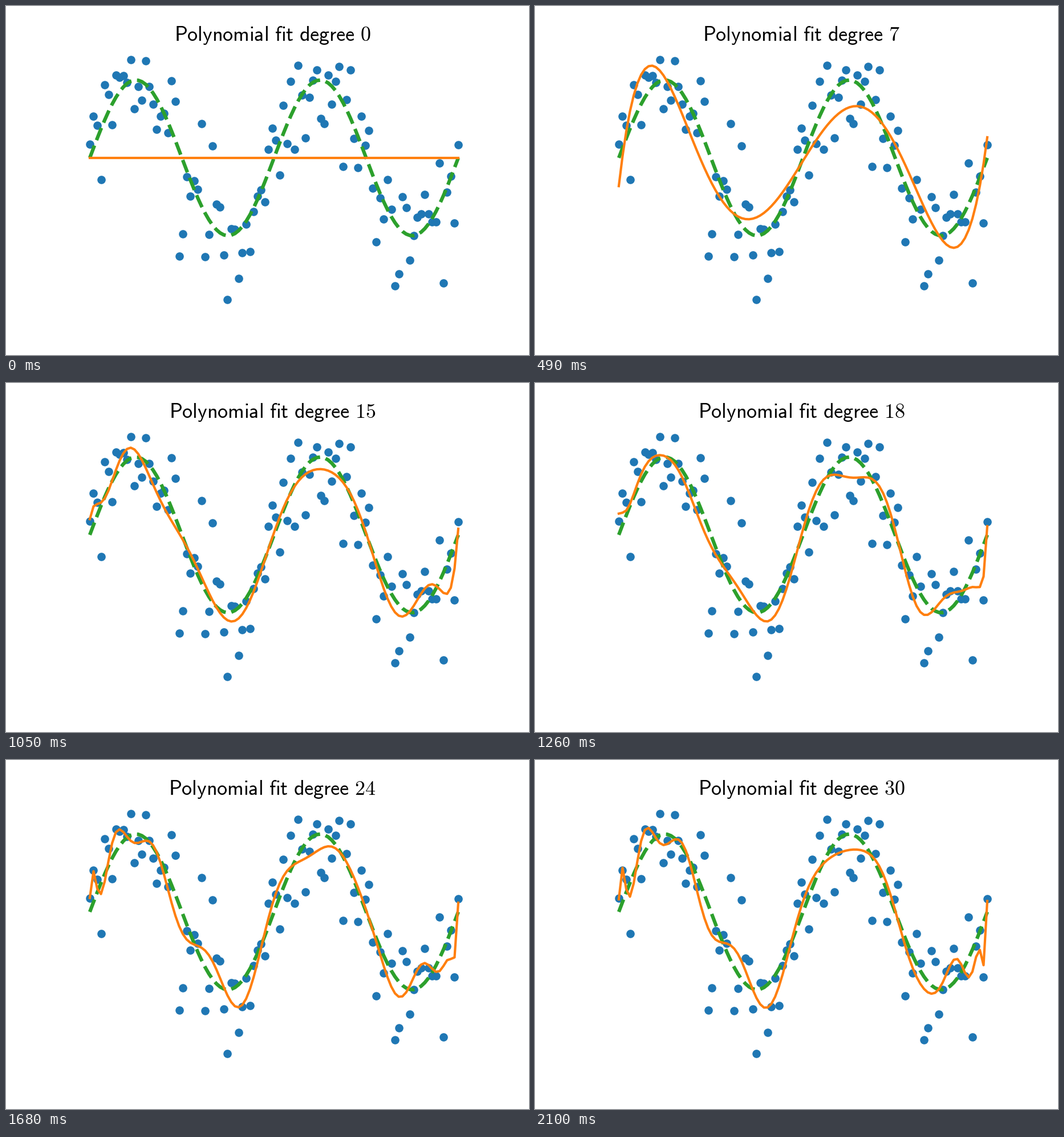
A matplotlib script for the animation above (2.17 s loop, 917 by 611 pixels).

```python
import numpy as np
import matplotlib.pyplot as plt
from matplotlib.animation import FuncAnimation

plt.rcParams["mathtext.fontset"] = "cm"

W, H, DPI = 917, 611, 150
DEGREES = 31
INTERVAL = 70

# Noisy samples of two sine periods
x = np.linspace(0, 1, 100)
wave = np.sin(4 * np.pi * x)
samples = wave + 0.5 * np.random.default_rng(1).standard_normal(x.size)


def fit(terms):
    """Least-squares polynomial with the given number of coefficients."""
    basis = np.vander(x, terms, increasing=True)
    coef = np.linalg.lstsq(basis, samples, rcond=None)[0]
    return basis @ coef


def heading(degree):
    return rf"$\mathsf{{Polynomial\ fit\ degree\ {degree}}}$"


fig = plt.figure(figsize=(W / DPI, H / DPI), dpi=DPI, facecolor="white")
ax = fig.add_axes([0.125, 0.11, 0.775, 0.77])
ax.set_xlim(-0.05, 1.05)
ax.set_ylim(-2.04, 1.4135)
ax.axis("off")

ax.scatter(x, samples, color="tab:blue")
ax.plot(x, wave, "--", color="tab:green", lw=3)
curve, = ax.plot(x, fit(0), color="tab:orange", lw=2)
title = fig.text(467 / W, 1 - 60.5 / H, heading(0), fontsize=17.28,
                 color="black", ha="center", va="baseline")


def update(degree):
    curve.set_ydata(fit(degree))
    title.set_text(heading(degree))
    return curve, title


anim = FuncAnimation(fig, update, frames=DEGREES, interval=INTERVAL,
                     repeat=True, repeat_delay=0, blit=False)
plt.show()
```
